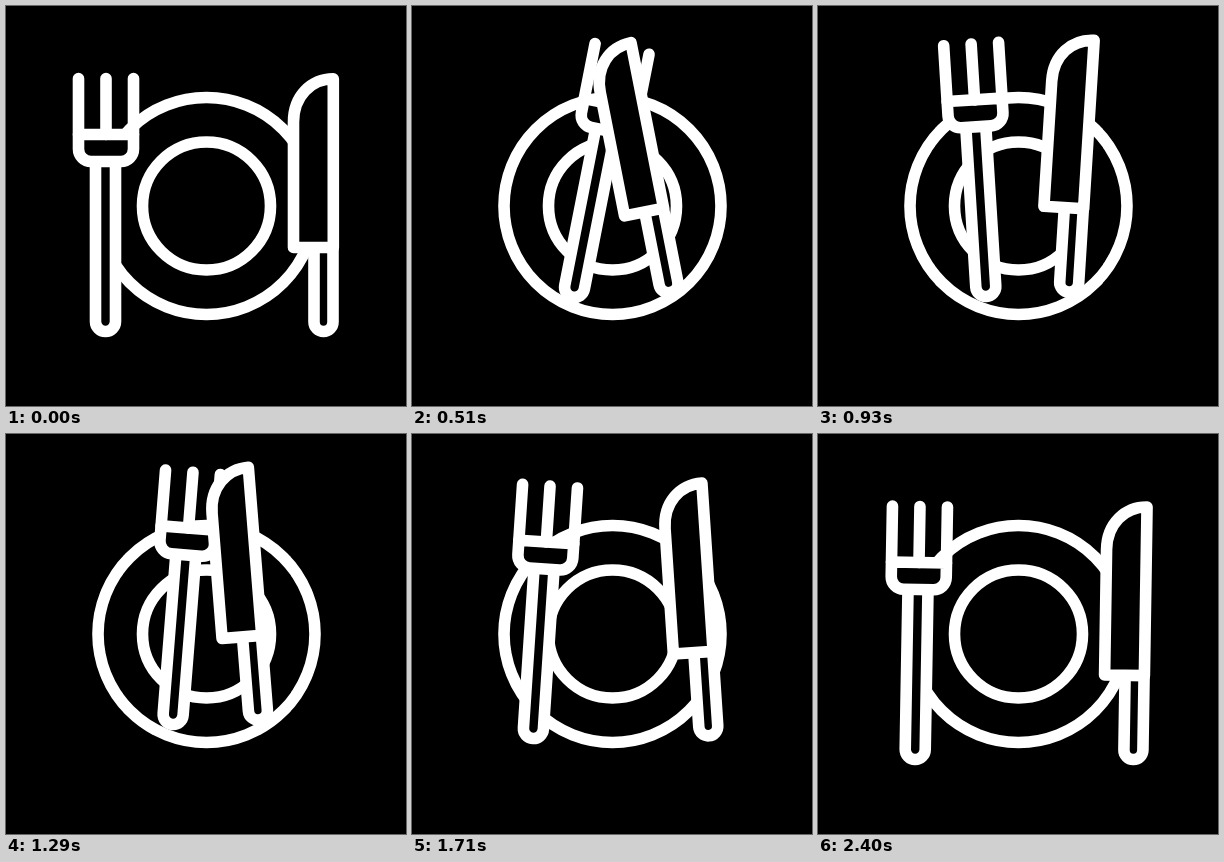
An HTML page for the animation above (2.49 s loop, 400 by 400 pixels).

```html
<!DOCTYPE html>
<html lang="en">
<head>
<meta charset="utf-8">
<title>Plate, fork and knife</title>
<style>
  html, body { margin: 0; width: 100%; height: 100%; overflow: hidden; background: #000; }
  svg { display: block; width: 100%; height: 100%; }
</style>
</head>
<body>
<svg viewBox="0 0 400 400" fill="#000" stroke="#fff" stroke-width="11.6" stroke-linecap="round" stroke-linejoin="round">
  <circle cx="200.5" cy="200" r="108.5"/>
  <circle cx="200.5" cy="200" r="64"/>
  <g id="fork">
    <path d="M89.5 156V315.5a10 10 0 0 0 20 0V156"/>
    <path d="M72.5 128.5V143a12.5 12.5 0 0 0 12.5 12.5H115a12.5 12.5 0 0 0 12.5 -12.5V128.5Z"/>
    <path d="M72.5 72.5V128.5M100 72.5V128.5M127.5 72.5V128.5"/>
  </g>
  <g id="knife">
    <path d="M308 241.5V316a9.5 9.5 0 0 0 19 0V241.5"/>
    <path d="M327.3 72.8C305 73 287.5 90 287.5 116V241.5H327.3Z"/>
  </g>
</svg>
<script>
const LOOP = 2490, STEP = 30, LAST = 2400;
const fork = document.getElementById('fork');
const knife = document.getElementById('knife');

// keys are [time, value] pairs, eased in and out between neighbours
function track(keys, t) {
  let i = 1;
  while (i < keys.length && keys[i][0] < t) i++;
  if (i === keys.length) return keys[i - 1][1];
  const [t0, a] = keys[i - 1], [t1, b] = keys[i];
  const u = Math.max(0, (t - t0) / (t1 - t0));
  return a + (b - a) * u * u * (3 - 2 * u);
}

const IN = -3.8, OUT = 11.2;
const swing = [
  [0, 0], [180, -6], [520, OUT], [660, IN], [800, OUT], [940, IN],
  [1080, OUT], [1220, IN], [1350, OUT], [1480, IN], [1590, OUT],
  [1795, -0.6], [2100, 0]
];
const slide = [[110, 0], [580, 1], [1500, 1], [1840, 0]];
const drop = [[1560, 1], [1920, -0.07], [2150, 0]];
const forkLift = [[240, 0], [540, 1], ...drop];
const knifeLift = [[190, 0], [540, 1], ...drop];
const lean = [[2100, 0], [2400, 1]];

function place(el, x, y, angle, dx, dy) {
  el.setAttribute('transform',
    `translate(${dx.toFixed(2)} ${dy.toFixed(2)}) rotate(${angle.toFixed(3)} ${x} ${y})`);
}

function draw(time) {
  const t = Math.min(LAST, Math.floor(time / STEP) * STEP);
  const a = track(swing, t), s = track(slide, t), e = track(lean, t);
  place(fork, 100, 311, a + e, 68 * s - 2.2 * e, -35 * track(forkLift, t));
  place(knife, 317, 311, -a + 0.9 * e, -66 * s - 2 * e, -39.5 * track(knifeLift, t));
}

function tick() {
  draw(performance.now() % LOOP);
  requestAnimationFrame(tick);
}
tick();
</script>
</body>
</html>
```
